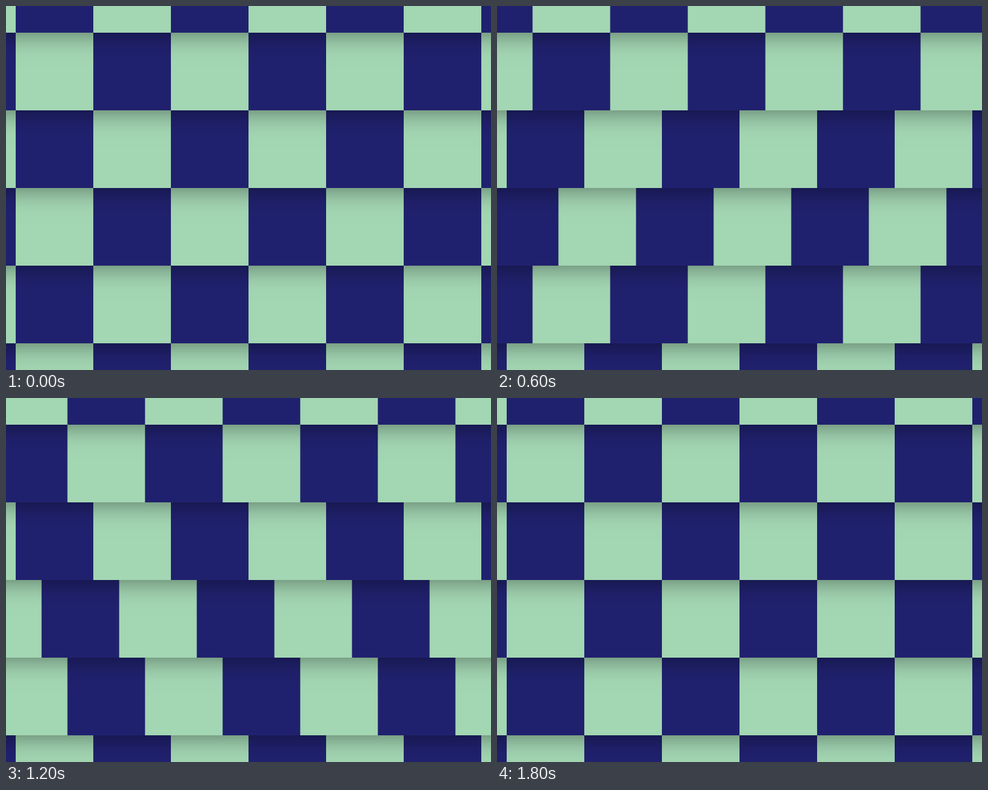
An HTML page with a canvas that plays this animation: 800 by 600 pixels, repeating every 1.83 s.

```html
<!DOCTYPE html>
<html lang="en">
<head>
<meta charset="utf-8">
<title>Sliding checkerboard</title>
<style>
  html, body { margin: 0; width: 100%; height: 100%; overflow: hidden; background: #a3d6b3; }
  canvas { display: block; }
</style>
</head>
<body>
<canvas width="800" height="600"></canvas>
<script>
const ctx = document.querySelector('canvas').getContext('2d');
const GREEN = '#a3d6b3', NAVY = '#20216e';
const SIZE = 128, PERIOD = 2 * SIZE;
const TOP = -84, LEFT = 16;
const STEP = 30, STEPS = 60, LOOP = 1830;

// Whole pattern periods each row travels per loop; the sign gives the direction.
const speeds = [2, -1, 3, -2, 2, -3];

function drawRow(row, progress) {
  const y = TOP + row * SIZE;

  // The strip casts its shadow onto the row below.
  ctx.shadowColor = 'rgba(0, 0, 0, 0.5)';
  ctx.shadowBlur = 40;
  ctx.fillStyle = GREEN;
  ctx.fillRect(-200, y, 1200, SIZE);

  ctx.shadowColor = 'transparent';
  ctx.fillStyle = NAVY;
  const shift = LEFT + (row % 2) * SIZE + speeds[row] * progress * PERIOD;
  const first = ((shift % PERIOD) + PERIOD) % PERIOD - PERIOD;
  for (let x = first; x < 800; x += PERIOD) ctx.fillRect(x, y, SIZE, SIZE);
}

function draw(time) {
  const step = Math.floor((time % LOOP) / STEP);
  for (let row = speeds.length - 1; row >= 0; row--) drawRow(row, step / STEPS);
}

const start = performance.now();
function tick(now) {
  draw(Math.max(0, now - start) + 0.5);
  requestAnimationFrame(tick);
}
draw(0);
requestAnimationFrame(tick);
</script>
</body>
</html>
```
